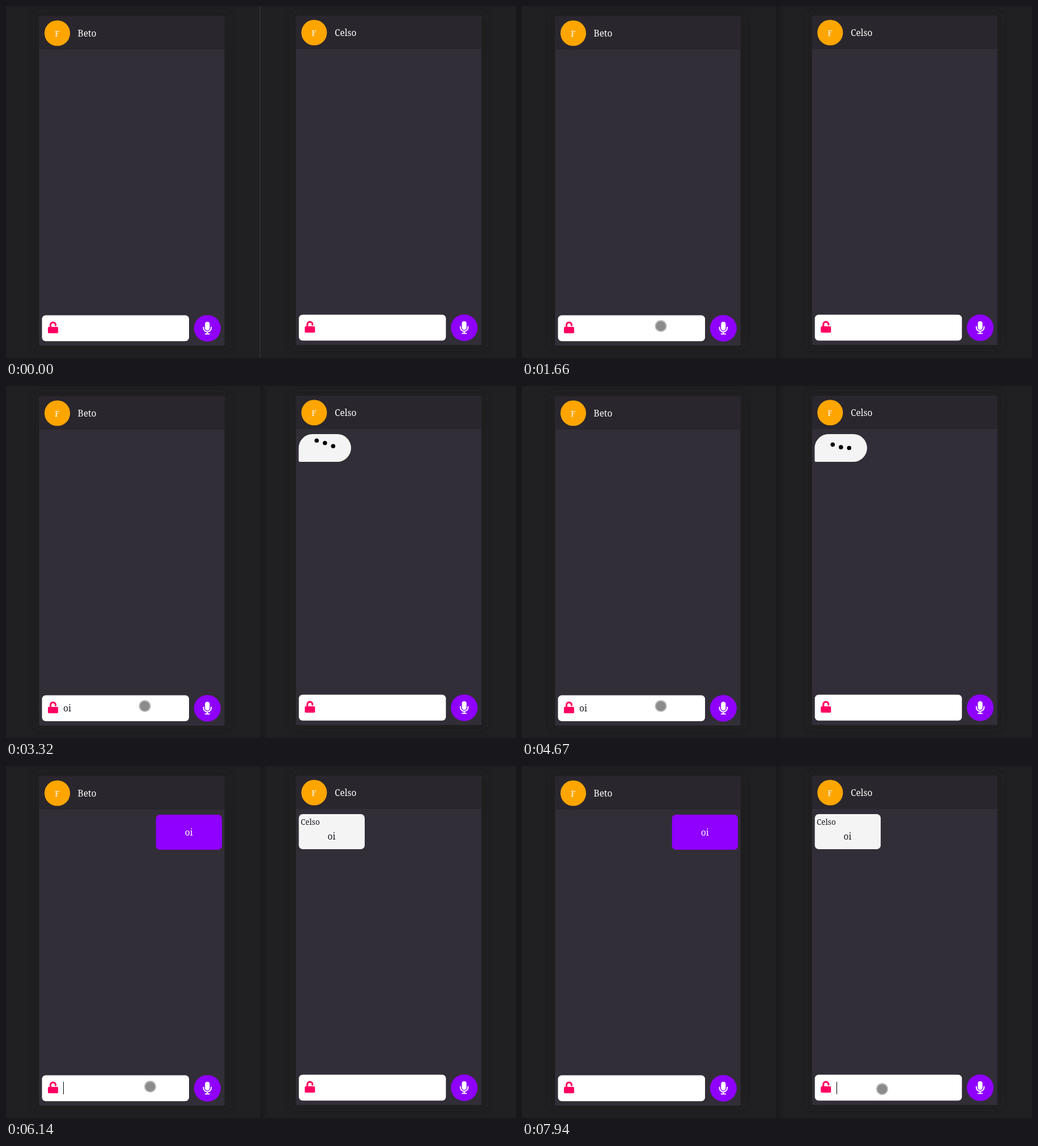
An HTML page that plays this animation: 900 px wide and 622 px high, repeating every 8000 ms.

```html
<!DOCTYPE html>
<html lang="pt">
<head>
<meta charset="utf-8">
<title>Chat</title>
<style>
html, body { margin: 0; width: 100%; height: 100%; overflow: hidden; background: #202022; }
svg { display: block; width: 900px; height: 622px; }
text { font-family: "Noto Serif", serif; font-size: 15.5px; }
.title { fill: #fff; font-weight: 500; }
.ink { fill: #1f1a24; }
</style>
</head>
<body>
<svg viewBox="0 0 900 622">
  <defs>
    <filter id="blur" x="-20%" y="-20%" width="140%" height="140%"><feGaussianBlur stdDeviation="8"/></filter>
    <linearGradient id="edge">
      <stop offset="0" stop-color="#19191b"/><stop offset="1" stop-color="#19191b" stop-opacity="0"/>
    </linearGradient>
    <g id="phone">
      <rect x="54" y="14" width="336" height="590" fill="#1b1b1d" opacity=".65" filter="url(#blur)"/>
      <rect x="58.5" y="18" width="327" height="582" fill="#322e38"/>
      <rect x="58.5" y="18" width="327" height="59" fill="#2a262d"/>
      <circle cx="90.5" cy="48" r="22.6" fill="#ffa500"/>
      <text class="title" x="90.3" y="54" text-anchor="middle" style="font-size:14.5px">F</text>
      <rect x="63.5" y="546.5" width="259.5" height="45.7" rx="6.5" fill="#fff"/>
      <g fill="#ff0062">
        <rect x="74" y="567" width="18" height="11.3" rx="1.8"/>
        <path d="M78.5 568V563.6a4.5 4.5 0 0 1 9 0V564.3" fill="none" stroke="#ff0062" stroke-width="3.1" stroke-linecap="round"/>
      </g>
      <circle cx="355.3" cy="569.5" r="23.6" fill="#8f00ff"/>
      <rect x="351.2" y="558" width="8.2" height="15.4" rx="4.1" fill="#fff"/>
      <path d="M348.5 567.5V569a6.8 6.8 0 0 0 13.6 0V567.5M355.3 575.8V579.5M351.7 579.5H358.9" fill="none" stroke="#fff" stroke-width="2" stroke-linecap="round"/>
    </g>
  </defs>
  <rect width="900" height="622" fill="#202022"/>
  <rect id="divider" x="448" width="1" height="622" fill="#38383a"/>
  <rect id="shade" x="449" width="14" height="622" fill="url(#edge)"/>
  <use href="#phone"/>
  <use href="#phone" x="453.3" y="-1"/>
  <text class="title" x="126.5" y="54.3">Beto</text>
  <text class="title" x="580" y="53.3">Celso</text>

  <g id="sent">
    <rect x="264.7" y="86" width="116.3" height="62" rx="7" fill="#8f00ff"/>
    <text class="title" x="322.8" y="123.3" text-anchor="middle">oi</text>
    <rect x="516.7" y="85" width="116.3" height="62" rx="7" fill="#f4f4f4"/>
    <text class="ink" x="520" y="103.5" style="font-size:13.6px">Celso</text>
    <text class="ink" x="574.5" y="130" text-anchor="middle">oi</text>
  </g>

  <g id="typing">
    <path d="M541 85H584.5a24.5 24.5 0 0 1 0 49H518.5a2 2 0 0 1-2-2V109.5a24.5 24.5 0 0 1 24.5-24.5Z" fill="#f4f4f4"/>
    <circle class="dot" cx="548.3" r="3.8"/>
    <circle class="dot" cx="562.8" r="3.8"/>
    <circle class="dot" cx="577.3" r="3.8"/>
  </g>

  <text id="draft" class="ink" x="101" y="575"></text>
  <rect id="caret" y="558" width="1" height="22" fill="#000"/>
  <circle id="pointer" r="9.6" fill="#8b8b8b" stroke="#bcbcbc" stroke-width="2"/>
</svg>
<script>
const LOOP = 8000, FOCUS = 1130, TYPING = 2780, SENT = 4820, TYPING_END = 5350;
const BOUNCE = { delay: 200, stagger: 100, period: 1500, rise: 420, fall: 240, height: 14, rest: 109.5 };

// from, until, x
const CARETS = [
  [FOCUS, 1660, 101], [2120, 2580, 101], [2710, TYPING, 110],
  [TYPING, 3300, 115], [3790, 4270, 115], [4740, SENT, 115],
  [SENT, TYPING_END, 101], [5810, 6300, 101],
  [6940, 7470, 555], [7940, LOOP, 555]
];

const $ = id => document.getElementById(id);
const dots = document.querySelectorAll(".dot");
const show = (id, on) => $(id).setAttribute("visibility", on ? "visible" : "hidden");
const clamp = v => Math.min(1, Math.max(0, v));

// CSS ease-in-out: cubic-bezier(.42, 0, .58, 1)
function easeInOut(x) {
  if (x <= 0 || x >= 1) return clamp(x);
  let lo = 0, hi = 1, s = .5;
  for (let i = 0; i < 18; i++) {
    s = (lo + hi) / 2;
    const bx = 1.26 * s * (1 - s) ** 2 + 1.74 * s * s * (1 - s) + s ** 3;
    if (bx < x) lo = s; else hi = s;
  }
  return s * s * (3 - 2 * s);
}

function lift(t, index) {
  const b = BOUNCE, start = TYPING + b.delay + index * b.stagger;
  if (t < start) return 0;
  const p = (t - start) % b.period;
  return b.height * (p < b.rise ? easeInOut(p / b.rise) : 1 - easeInOut((p - b.rise) / b.fall));
}

function pointerAt(t) {
  if (t < 6140) {
    const k = easeInOut((t - 470) / 590);
    return [616 - 371 * k, 592 - 26.5 * k];
  }
  const k = easeInOut((t - 6100) / 370);
  const settle = clamp((t - 6480) / 200);
  return [245 + 390 * k + settle * .6, 565.5 + 6.5 * k + 11 * Math.sin(Math.PI * k) - settle * 1.2];
}

function render(t) {
  show("divider", t < FOCUS);
  show("shade", t >= FOCUS);
  show("sent", t >= SENT);

  show("typing", t >= TYPING && t < TYPING_END);
  $("typing").setAttribute("transform", `translate(0 ${t >= SENT ? 89 : 0})`);
  dots.forEach((dot, i) => dot.setAttribute("cy", BOUNCE.rest - lift(t, i)));

  $("draft").textContent = t < 2710 || t >= SENT ? "" : t < TYPING ? "o" : "oi";

  const caret = CARETS.find(([from, until]) => t >= from && t < until);
  show("caret", caret);
  if (caret) $("caret").setAttribute("x", caret[2]);

  show("pointer", t >= 520);
  const [x, y] = pointerAt(t);
  $("pointer").setAttribute("transform", `translate(${x} ${y})`);
}

const origin = performance.now();
function tick() {
  render((performance.now() - origin) % LOOP);
  requestAnimationFrame(tick);
}
tick();
</script>
</body>
</html>
```
